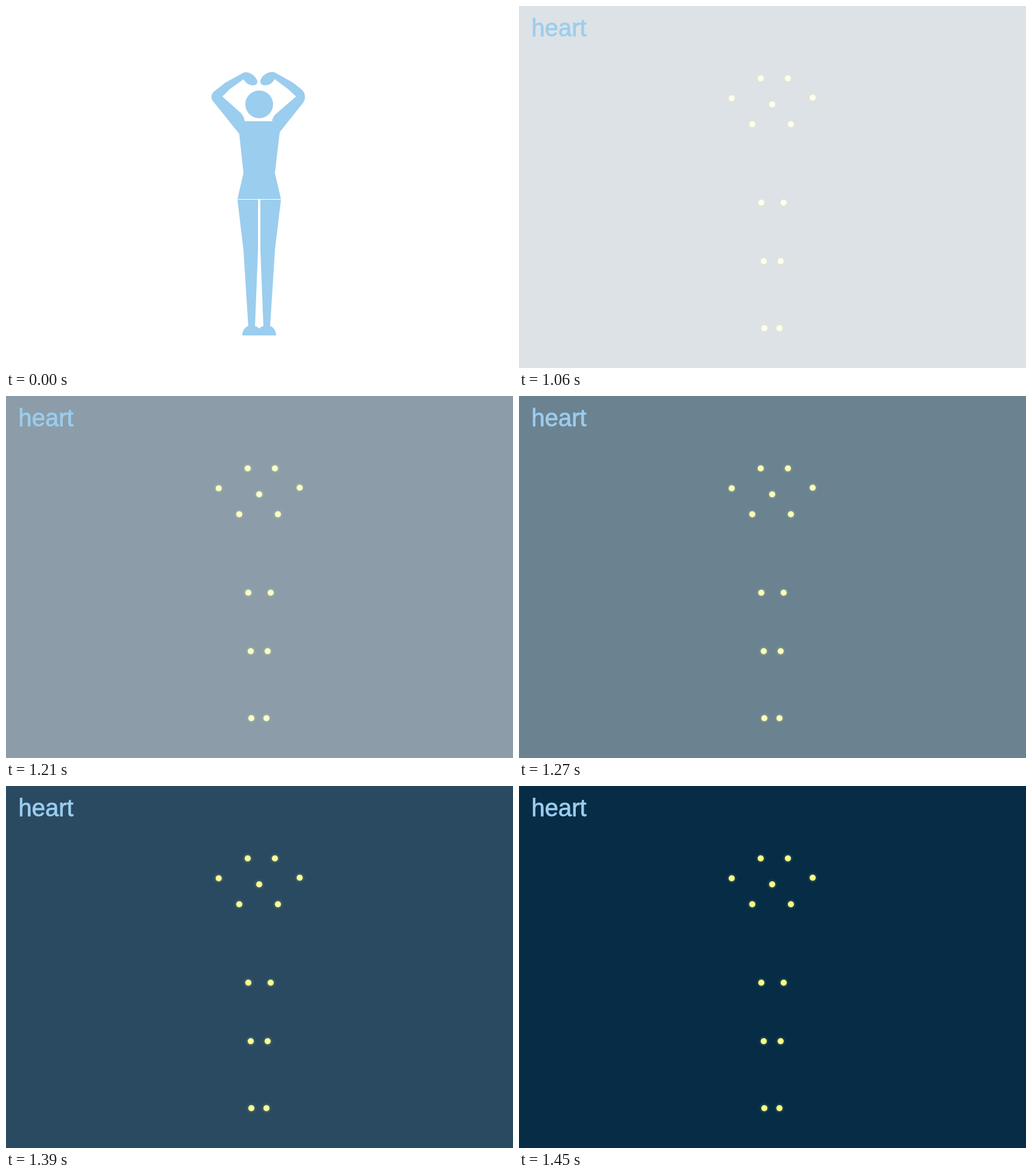
Animation, 839 px wide and 600 px high, one loop 2.95 s. Source, as an HTML page:

```html
<!DOCTYPE html>
<html lang="en">
<head>
<meta charset="utf-8">
<title>heart</title>
<style>
  html, body { margin: 0; width: 100%; height: 100%; overflow: hidden; background: #fefefe; }
  svg { display: block; width: 839px; height: 600px; }
  #figure, #word { fill: #9bcdee; }
  #word {
    font: 40px "Liberation Sans", Arial, sans-serif;
    stroke: #9bcdee;
    stroke-width: .8px;
  }
  #dots { filter: drop-shadow(0 0 2px rgba(246, 255, 134, .5)); }
</style>
</head>
<body>
<svg viewBox="0 0 839 600">
  <rect id="sky" width="839" height="600"/>
  <g id="figure">
    <circle cx="419" cy="163" r="23"/>
    <!-- arms and torso -->
    <path d="M395 191H440.500C441 184 446 179 450 176L480 150L467 138L444.500 121
      C441 128 435 131.500 429 131.500C421 131.500 419 126 422.500 120
      C427 112 438 107.500 444.500 110L475 127L490 139C496 145 496 154 492 160
      L453 209L445 277L455 320H383L393 277L386 212L342 157C339 152 339 147 344 142
      L363 127L393 110.500C399 107.500 411 113 415 122C418 128 414 132 408 131.500
      C402 131 397 128 393 121.500L370 138L358 150L386 175C391 179 394 184 395 191Z"/>
    <!-- legs -->
    <path d="M383 321H417V405L412 532H401L393 405Z"/>
    <path d="M421 321H455L445 405L437 532H426L421 405Z"/>
    <!-- feet -->
    <path d="M391 546C391 538 396 531 402 530.500H412C415 531 418 533 419 535
      C421 532 424 531 426 530.500H437C443 532 447 539 447 546Z"/>
  </g>
  <g id="scene">
    <g id="dots"></g>
    <text id="word" x="20.500" y="49.600">heart</text>
  </g>
</svg>
<script>
  const LOOP = 2950, START = 1000, STEP = 30, STEPS = 15;
  const JOINTS = [
    [400, 120], [445, 120], [352, 153], [486, 152], [419, 163],
    [386, 196], [450, 196], [401, 326], [438, 326],
    [405, 423], [433, 423], [406, 534], [431, 534]
  ];
  const WHITE = [254, 254, 254], NIGHT = [6, 44, 70], GLOW = [246, 255, 134];

  const el = id => document.getElementById(id);
  const sky = el('sky'), figure = el('figure'), scene = el('scene'), dots = el('dots');

  for (const [x, y] of JOINTS) {
    const dot = document.createElementNS('http://www.w3.org/2000/svg', 'circle');
    dot.setAttribute('cx', x);
    dot.setAttribute('cy', y);
    dot.setAttribute('r', 5);
    dots.append(dot);
  }

  const mix = (a, b, p) => `rgb(${a.map((v, i) => Math.round(v + (b[i] - v) * p))})`;

  function draw(t) {
    const night = t >= START;
    const k = night ? Math.min(STEPS, Math.floor((t - START) / STEP)) : 0;
    const p = k === STEPS ? 1 : k / 15.2;
    figure.style.display = night ? 'none' : '';
    scene.style.display = night ? '' : 'none';
    dots.style.display = k ? '' : 'none';
    sky.style.fill = night ? mix(WHITE, NIGHT, p) : '#fff';
    dots.style.fill = mix(WHITE, GLOW, p);
  }

  const begin = performance.now();
  function tick() {
    draw((performance.now() - begin) % LOOP);
    requestAnimationFrame(tick);
  }
  tick();
</script>
</body>
</html>
```
